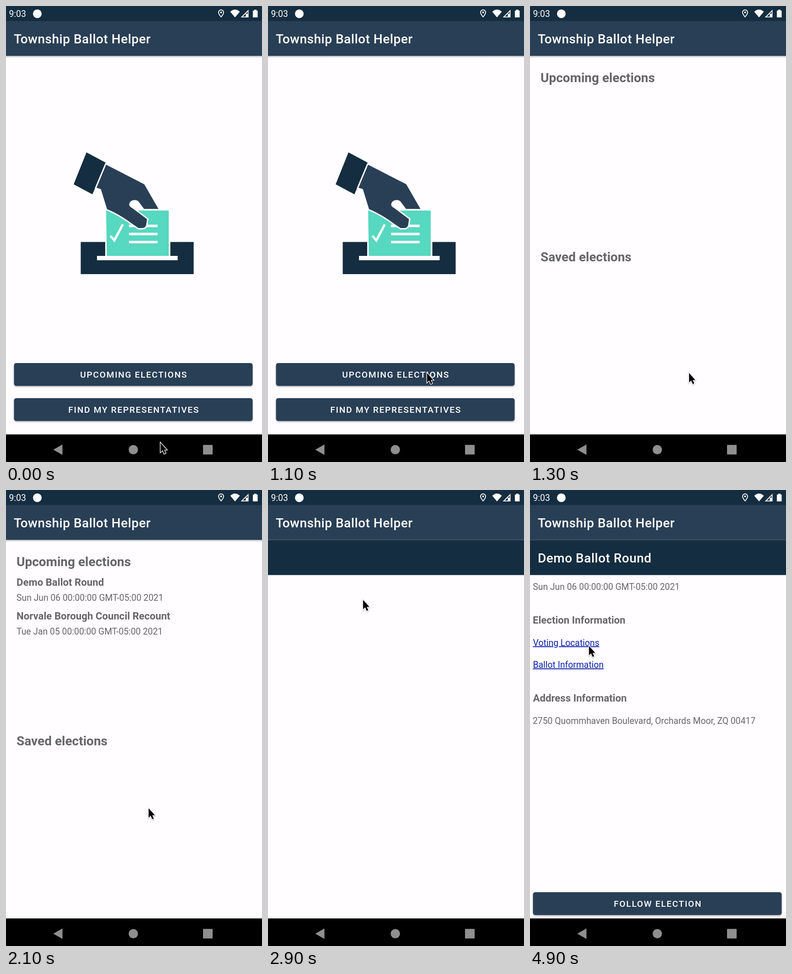
An HTML page that plays this animation: 560x1000 px, repeating every 5 s.

```html
<!DOCTYPE html>
<html lang="en">
<head>
<meta charset="utf-8">
<title>Ballot app</title>
<style>
  html, body { margin: 0; width: 100%; height: 100%; overflow: hidden; background: #fffdff; }
  svg { display: block; width: 100%; height: 100%; }
  text { font: 400 19.35px Roboto, sans-serif; fill: #666568; white-space: pre; }
  .title { font-size: 28px; font-weight: 500; letter-spacing: .5px; fill: #fff; }
  .head { font-size: 28px; font-weight: 700; }
  .item { font-size: 22.2px; font-weight: 700; }
  .link { fill: #0d1fae; text-decoration: underline; text-decoration-thickness: 1.1px; text-underline-offset: 2px; text-decoration-skip-ink: none; }
  .label { font-size: 19.2px; font-weight: 500; letter-spacing: 1.7px; fill: #fff; text-anchor: middle; }
  .navy { fill: #142d40; }
  .slate { fill: #293f56; }
  .button { filter: drop-shadow(0 2px 1.5px rgba(0, 0, 0, .32)); }
</style>
</head>
<body>
<svg viewBox="0 0 560 1000">
  <defs>
    <linearGradient id="fade" x2="0" y2="1">
      <stop stop-color="#000" stop-opacity=".2"/>
      <stop offset="1" stop-color="#000" stop-opacity="0"/>
    </linearGradient>
  </defs>
  <rect width="560" height="1000" fill="#fffdff"/>

  <g id="home">
    <path class="navy" d="M176 321L219 344L189 413L148 391Z"/>
    <path class="navy" d="M163.5 517.5H410.5V588H163.5Z"/>
    <path fill="#fffdff" d="M217 446H359.5V550H217ZM199 548H375.5V557.5H199Z"/>
    <path fill="#57d8c0" d="M219 448.5H356V548H220.5Z"/>
    <path stroke="#fffdff" stroke-width="5.5" d="M269 482.3H331.5M269 500H331.5M269 517.8H331.5"/>
    <path fill="none" stroke="#fffdff" stroke-width="5" d="M228.5 504L237 514L255.5 479"/>
    <path class="slate" stroke="#fffdff" stroke-width="6" paint-order="stroke"
      d="M219 348L302.5 391L333.5 445H302L290 429Q287 425.5 282 425.5Q270 426 269.5 436Q270 440 276 443L308.5 467.5L306.5 481Q304 487 298 487H290L276 477.5Q247 456 221 445.5L207.5 401.5L198 398.5Z"/>
    <g id="homeButtons"></g>
  </g>

  <g id="lists">
    <text class="head" x="23" y="167">Upcoming elections</text>
    <text class="head" x="23" y="560">Saved elections</text>
    <g id="items">
      <text class="item" x="23" y="210">Demo Ballot Round</text>
      <text x="23" y="243.3">Sun Jun 06 00:00:00 GMT-05:00 2021</text>
      <text class="item" x="23" y="284">Norvale Borough Council Recount</text>
      <text x="23" y="317.2">Tue Jan 05 00:00:00 GMT-05:00 2021</text>
    </g>
  </g>

  <rect id="shade" y="109.5" width="560" height="5" fill="url(#fade)"/>

  <g id="detail">
    <rect class="navy" y="109.5" width="560" height="77"/>
    <g id="info">
      <text class="title" x="17" y="159">Demo Ballot Round</text>
      <text x="6.3" y="219.2">Sun Jun 06 00:00:00 GMT-05:00 2021</text>
      <text class="item" x="6" y="292.5">Election Information</text>
      <text class="link" x="6.5" y="341.6">Voting Locations</text>
      <text class="link" x="6.5" y="390.2">Ballot Information</text>
      <text class="item" x="6.5" y="464">Address Information</text>
      <text x="6" y="513">2750 Quommhaven Boulevard, Orchards Moor, ZQ 00417</text>
      <g id="infoButton"></g>
    </g>
  </g>

  <rect class="navy" width="560" height="33"/>
  <rect class="slate" y="33" width="560" height="76.5"/>
  <text class="title" x="17" y="82">Township Ballot Helper</text>

  <g fill="#fff">
    <text x="6.5" y="24" style="fill:#fff">9:03</text>
    <circle cx="68.5" cy="17" r="9.5"/>
    <path fill="none" stroke="#fff" stroke-width="1.8" d="M470.5 24Q465 17.5 465 14A5.5 5.5 0 0 1 476 14Q476 17.5 470.5 24Z"/>
    <circle cx="470.5" cy="14" r="2"/>
    <path d="M490.500 12.500Q501 3 511.500 12.500L501 25Z"/>
    <path d="M530.5 8V25H513.5ZM528.7 12.5L518 23.2H524.5V17H528.7Z" fill-rule="evenodd"/>
    <path d="M543 8H548V10H550.5V25H540V10H543Z"/>
  </g>

  <rect y="939.5" width="560" height="60.5"/>
  <g fill="#8f8f8f">
    <path d="M103.5 973L123.5 961.5V984.5Z"/>
    <circle cx="278.5" cy="973" r="10.2"/>
    <rect x="431" y="962.5" width="21" height="21" rx="1"/>
  </g>

  <path id="cursor" stroke="#fff" stroke-width="2.6" paint-order="stroke" style="filter:drop-shadow(0 1px 1px rgba(0,0,0,.35))"
    d="M1 1V21.5L5.500 17.300L9 25L12.300 23.600L9 16.200H14.700Z"/>
</svg>
<script>
  const LOOP = 5000, STEP = 100;
  const $ = id => document.getElementById(id);

  // Pointer stops: time, x, y
  const path = [
    [0, 337, 957], [100, 339, 949], [600, 352, 855], [1000, 347, 804],
    [2000, 347, 804], [2100, 311, 697], [2200, 192, 354], [2300, 192, 354],
    [2700, 207, 240], [4600, 207, 240], [4700, 189, 264], [4800, 148, 317],
    [4900, 128, 341], [LOOP, 128, 341]
  ];

  function button(parent, x, y, w, label) {
    $(parent).insertAdjacentHTML('beforeend',
      `<rect class="slate button" x="${x}" y="${y}" width="${w}" height="50" rx="5"/>
       <text class="label" x="${x + w / 2 + 1.2}" y="${y + 32}">${label}</text>`);
  }

  function pointerAt(t) {
    const i = path.findIndex(p => p[0] > t);
    const [t0, x0, y0] = path[i - 1], [t1, x1, y1] = path[i];
    const k = (t - t0) / (t1 - t0);
    return [x0 + (x1 - x0) * k, y0 + (y1 - y0) * k];
  }

  function show(id, on) {
    $(id).style.display = on ? '' : 'none';
  }

  function draw(now) {
    const t = Math.floor(now % LOOP / STEP) * STEP;
    show('home', t < 1300);
    show('lists', t >= 1300 && t < 2900);
    show('items', t >= 1600);
    $('items').style.opacity = t < 1700 ? .5 : 1;
    show('shade', t < 2900);
    show('detail', t >= 2900);
    show('info', t >= 4300);
    $('cursor').setAttribute('transform', `translate(${pointerAt(t)})`);
  }

  button('homeButtons', 17.5, 783, 522, 'UPCOMING ELECTIONS');
  button('homeButtons', 17.5, 860, 522, 'FIND MY REPRESENTATIVES');
  button('infoButton', 6.5, 882, 544, 'FOLLOW ELECTION');

  const start = performance.now();
  function tick() {
    draw(performance.now() - start);
    requestAnimationFrame(tick);
  }
  tick();
</script>
</body>
</html>
```
